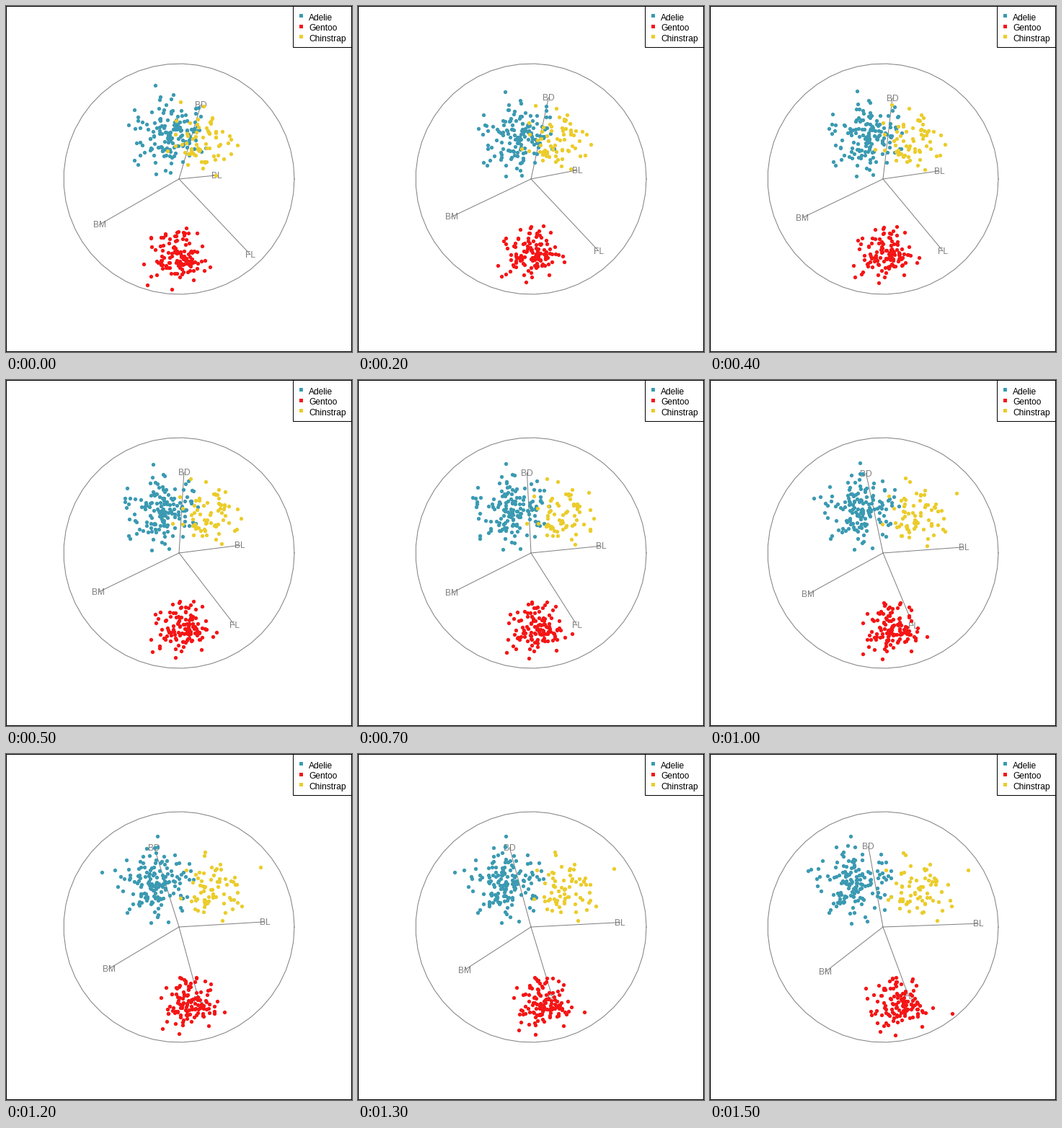
Animation, 480 px wide and 480 px high, one loop 1600 ms. Source, as a matplotlib script:

```python
import numpy as np
import matplotlib.pyplot as plt
from matplotlib.animation import FuncAnimation
from matplotlib.patches import Rectangle

SIZE, STEPS, INTERVAL = 480, 16, 100
PX = 0.75  # points per pixel at 96 dpi
CENTRE, RADIUS = SIZE / 2, 160
SPREAD = 0.355
GREY = "#7f7f7f"
LABELS = ["BL", "BD", "FL", "BM"]

plt.rcParams["font.family"] = "Liberation Sans"

# Bill length, bill depth (mm), flipper length (mm), body mass (g)
GRAND_MEAN = np.array([43.99, 17.16, 200.97, 4207])
GRAND_SD = np.array([5.47, 1.97, 14.02, 805])
GROUP_SD = np.array([2.95, 1.12, 6.6, 460])

SPECIES = [
    dict(name="Adelie", color="#3B9AB2", n=146, corr=0.44,
         mean=[38.82, 18.35, 190.1, 3706],
         extremes=[(37.9, 18.6, 172, 3150), (34.6, 21.1, 198, 4400)]),
    dict(name="Gentoo", color="#F51515", n=119, corr=0.68,
         mean=[47.57, 15.0, 217.2, 5092],
         extremes=[(59.6, 17.0, 230, 6050), (49.2, 15.2, 221, 6300)]),
    dict(name="Chinstrap", color="#EBCC2A", n=68, corr=0.57,
         mean=[48.83, 18.42, 195.8, 3733],
         extremes=[(58.0, 17.8, 181, 3700), (46.1, 18.2, 178, 3250)]),
]

# Turning points of the tour: step -> x and y of each axis tip, in pixels
TURNS = {
    0: [(52, 30, 99, -110), (-5, -103, 105, 63)],
    2: [(64, 24, 94, -110), (-12, -113, 100, 52)],
    12: [(121, -35, 28, -99), (-7, -110, 101, 58)],
    15: [(132, -21, 36, -80), (-4, -112, 96, 62)],
}


def sample(rng, n, mean, corr, extremes, **_):
    """Equicorrelated Gaussian cloud, nearest members moved to the extremes."""
    mix = np.linalg.cholesky(np.full((4, 4), corr) + (1 - corr) * np.eye(4))
    z = rng.standard_normal((n, 4))
    z -= z.mean(axis=0)
    z = z @ np.linalg.inv(np.linalg.cholesky(np.cov(z.T))).T
    z *= np.minimum(1, 2.6 / np.linalg.norm(z, axis=1, keepdims=True))
    cloud = mean + (z @ mix.T) * GROUP_SD
    for point in extremes:
        gap = np.linalg.norm((cloud - point) / GRAND_SD, axis=1)
        cloud[np.argmin(gap)] = point
    return (cloud - GRAND_MEAN) / GRAND_SD


def projection(step):
    """Orthonormal 4 x 2 frame between the turning points, scaled to the circle."""
    steps = list(TURNS)
    tips = np.reshape(list(TURNS.values()), (len(steps), 8))
    blend = [np.interp(step, steps, column) for column in tips.T]
    u, _, vt = np.linalg.svd(np.reshape(blend, (2, 4)).T, full_matrices=False)
    return RADIUS * u @ vt


def outline(x, y, w, h, **style):
    ax.add_patch(Rectangle((x, y), w, h, ec="black", lw=PX, snap=False,
                           joinstyle="miter", **style))


fig = plt.figure(figsize=(5, 5), dpi=96, facecolor="white")
ax = fig.add_axes([0, 0, 1, 1])
ax.set(xlim=(0, SIZE), ylim=(SIZE, 0))
ax.axis("off")

thin = dict(color=GREY, lw=PX, snap=False, zorder=1)
theta = np.linspace(0, 2 * np.pi, 50)
ax.plot(CENTRE + RADIUS * np.cos(theta), CENTRE - RADIUS * np.sin(theta), **thin)
spokes = [ax.plot([], [], **thin)[0] for _ in LABELS]
tags = [ax.text(0, 0, name, color=GREY, size=12 * PX, ha="center",
                va="baseline", zorder=2) for name in LABELS]

rng = np.random.default_rng(7)
clouds = []
for order, kind in enumerate(SPECIES):
    dots = ax.scatter([], [], s=(5.3 * PX) ** 2, c=kind["color"], linewidths=0,
                      antialiaseds=False, zorder=3 + order / 10)
    clouds.append((dots, sample(rng, **kind)))

outline(0.5, 0.5, 479, 479, fc="none", zorder=6)
outline(398.5, 0.5, 81, 57, fc="white", zorder=5)
for row, kind in enumerate(SPECIES):
    ax.add_patch(Rectangle((407, np.floor(11.6 + 14.4 * row)), 5, 5,
                           fc=kind["color"], lw=0, zorder=7))
    ax.text(420, np.floor(20 + 14.5 * row), kind["name"], color="black",
            size=12 * PX, ha="left", va="baseline", zorder=7)


def draw(step):
    basis = projection(step)
    for spoke, tag, (dx, dy) in zip(spokes, tags, basis):
        x, y = CENTRE + dx, CENTRE + dy
        spoke.set_data([CENTRE, x], [CENTRE, y])
        tag.set_position((x, y + 4))
    for dots, data in clouds:
        xy = CENTRE + SPREAD * data @ basis
        dots.set_offsets(np.floor(xy) + 0.5)
    return [*spokes, *tags, *(dots for dots, _ in clouds)]


anim = FuncAnimation(fig, draw, frames=STEPS, interval=INTERVAL,
                     init_func=lambda: draw(0), repeat=True, blit=False)
plt.show()
```
